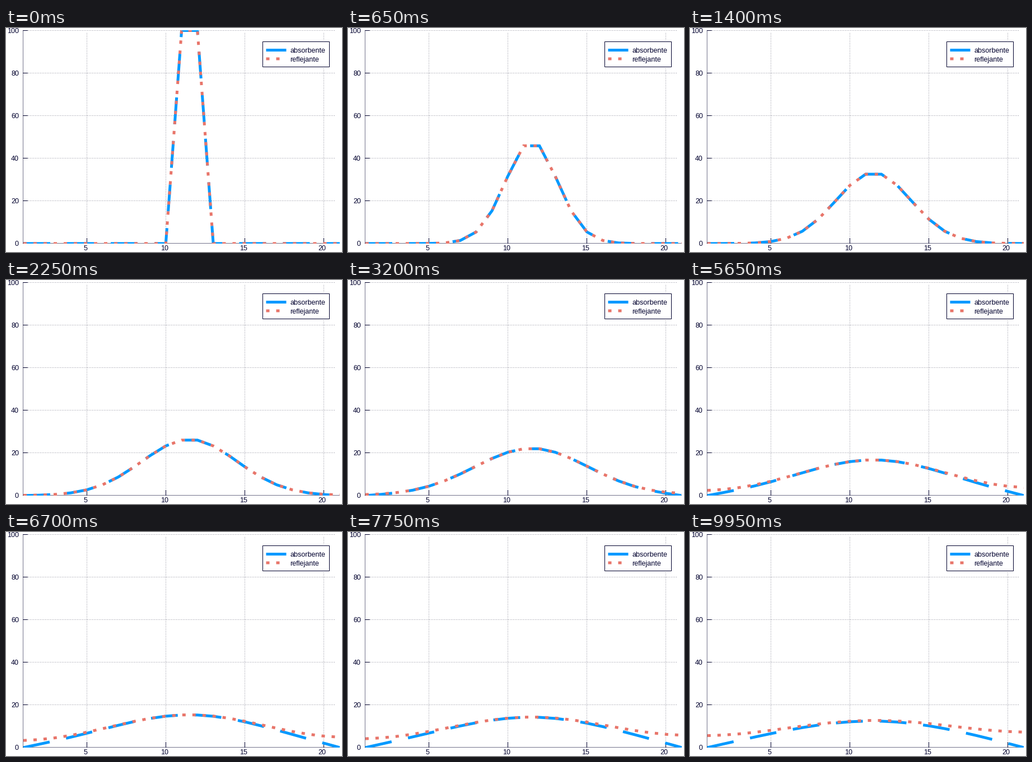
Animation of 600 by 400 pixels, one loop 10000 ms. Source, as a matplotlib script:

```python
import math

import numpy as np
import matplotlib.pyplot as plt
from matplotlib.animation import FuncAnimation
from matplotlib.patches import Rectangle

plt.rcParams["font.family"] = "Liberation Sans"
plt.rcParams["path.simplify"] = False

W, H, DPI = 600, 400, 100
FRAMES, INTERVAL = 200, 50
CELLS, RATE = 21, 0.1

LEFT, RIGHT, TOP, BOTTOM = 31, 596.2, 4.4, 384.9
NAVY, GRID = "#00002d", "#858594"
BLUE, CORAL = "#0099ff", "#e8756a"
THICK = 5
DASHES, DOTS, FINE_DOTS = (9.6, 6), (1.2, 2.4), (1, 2)


def pt(px):
    return px * 72 / DPI


def px_x(cell):
    return LEFT + (cell - 1) * (RIGHT - LEFT) / (CELLS - 1)


def px_y(value):
    return BOTTOM - value * (BOTTOM - TOP) / 100


def mid(px):
    """Centre of the pixel holding this coordinate."""
    return math.floor(px) + 0.5


def diffuse(reflecting):
    """Explicit heat equation; one row per time step."""
    u = np.zeros(CELLS)
    u[10:12] = 100
    rows = [u]
    for _ in range(FRAMES - 1):
        ends = (u[0], u[-1]) if reflecting else (0, 0)
        padded = np.concatenate(([ends[0]], u, [ends[1]]))
        u = u + RATE * (padded[2:] - 2 * u + padded[:-2])
        if not reflecting:
            u[0] = u[-1] = 0
        rows.append(u)
    return np.array(rows)


fig = plt.figure(figsize=(W / DPI, H / DPI), dpi=DPI, facecolor="white")
ax = fig.add_axes([0, 0, 1, 1])
ax.set_xlim(0, W)
ax.set_ylim(H, 0)
ax.axis("off")


def line(xs, ys, color=NAVY, width=1, dashes=None, **kw):
    return ax.plot(xs, ys, color=color, lw=pt(width),
                   ls=(0, dashes) if dashes else "-",
                   solid_capstyle="butt", dash_capstyle="butt",
                   dash_joinstyle="miter", snap=False, **kw)[0]


def label(x, baseline, text, ha="left", **kw):
    ax.text(x, baseline, text, color=NAVY, fontsize=pt(12.5), ha=ha,
            va="baseline", **kw)


# Grid, ticks and axes
for value in range(0, 101, 20):
    y = mid(px_y(value))
    if value:
        line([LEFT, 588], [y, y], GRID, dashes=FINE_DOTS, zorder=1)
    line([30, 39], [y, y], zorder=2)
    label(23, y + 4.5, str(value), "right")
for cell in range(5, 21, 5):
    x = mid(px_x(cell))
    line([x, x], [385, 9], GRID, dashes=FINE_DOTS, zorder=1)
    line([x, x], [385, 375], zorder=2)
    label(x - 2.7, 397.3, str(cell), "center")
line([30.5, 30.5], [4, 385], alpha=0.55, zorder=2)
line([30, 596], [384.5, 384.5], alpha=0.55, zorder=2)

# Curves, cut off at the plot area
area = Rectangle((30, 4), 566, 381, transform=ax.transData)
cells = px_x(np.arange(1, CELLS + 1))


def curve(color, dashes, reflecting, zorder):
    rows = px_y(diffuse(reflecting))
    art = line(cells, rows[0], color, THICK, dashes, zorder=zorder)
    art.set_clip_path(area)
    return art, rows


curves = [curve(BLUE, DASHES, False, 3), curve(CORAL, DOTS, True, 4)]

# Legend
ax.add_patch(Rectangle((458.5, 24.5), 119, 45, facecolor="white",
                       edgecolor=NAVY, lw=pt(1), snap=False, zorder=5))
line([464.5, 500.5], [39.5, 39.5], BLUE, THICK, zorder=6)
line([464.5, 500.5], [55, 55], CORAL, THICK, DOTS, zorder=6)
label(507, 44, "absorbente", zorder=6)
label(507, 60, "reflejante", zorder=6)


def update(i):
    for art, rows in curves:
        art.set_ydata(rows[i])
    return [art for art, _ in curves]


anim = FuncAnimation(fig, update, frames=FRAMES, interval=INTERVAL,
                     repeat=True, repeat_delay=0)
plt.show()
```
